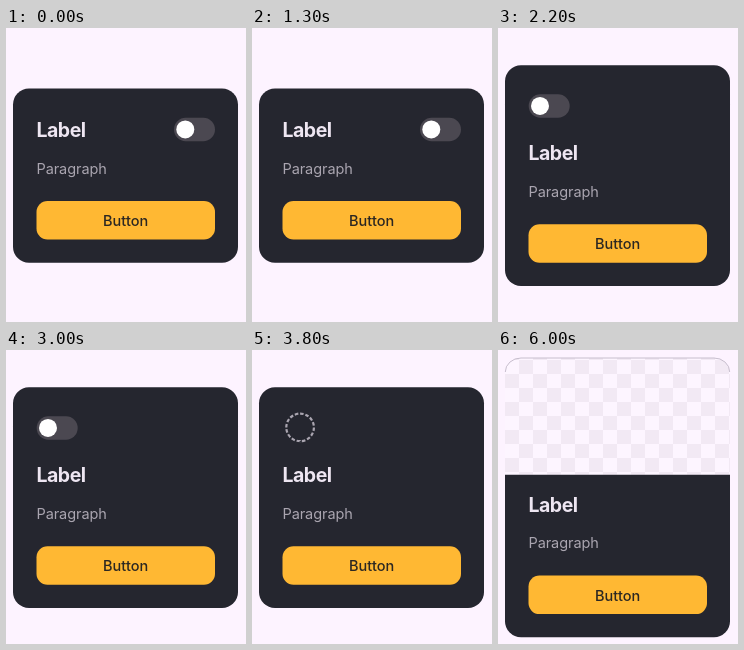
Animation, 240 px wide and 294 px high, one loop 8 s. Source, as an HTML page:

```html
<!DOCTYPE html>
<html lang="en">
<head>
<meta charset="utf-8">
<title>Card layouts</title>
<style>
  html, body { margin: 0; width: 100%; height: 100%; overflow: hidden; background: #fdf3ff; }
  svg { display: block; width: 100%; height: 100%; }
  text { font-family: Inter, sans-serif; }
  .label { font-size: 19.5px; font-weight: 650; letter-spacing: -.5px; fill: #eee6f2; }
  .paragraph { font-size: 14.5px; letter-spacing: -.08px; fill: #aaa5b0; }
  .button { font-size: 14.5px; font-weight: 450; fill: #2b2722; text-anchor: middle; }
</style>
</head>
<body>
<svg viewBox="0 0 240 294">
  <defs>
    <pattern id="checker" x="7" y="10" width="28" height="28" patternUnits="userSpaceOnUse">
      <rect width="28" height="28" fill="#fdf5ff"/>
      <path d="M14 0h14v14h-14zM0 14h14v14h-14z" fill="#f2e9f4"/>
    </pattern>
  </defs>

  <rect id="card" x="7" width="225" rx="16" fill="#25262f"/>

  <g id="toggle">
    <rect width="41" height="23.5" rx="11.75" fill="#4b4851"/>
    <circle cx="11.3" cy="11.7" r="9" fill="#fff"/>
  </g>

  <circle id="icon" cx="48.1" cy="77.4" r="13.8" fill="none" stroke="#aaa5b0" stroke-width="2.2"
          pathLength="80" stroke-dasharray="3.3 1.7"/>

  <g id="media">
    <path d="M6 124.6V7H233V124.6z" fill="#fdf3ff"/>
    <path d="M7 124.6V24a16 16 0 0 1 16-16H216a16 16 0 0 1 16 16V124.6z" fill="url(#checker)"/>
    <path d="M7.3 22A15.7 14 0 0 1 23 8H216A15.7 14 0 0 1 231.7 22"
          fill="none" stroke="#b9b0c0" stroke-width=".8"/>
  </g>

  <g id="content">
    <text class="label" x="30.5" y="109">Label</text>
    <text class="paragraph" x="30.5" y="145.9">Paragraph</text>
    <rect x="30.5" y="173" width="178.5" height="38.5" rx="11" fill="#ffb833"/>
    <text class="button" x="119.6" y="198">Button</text>
  </g>
</svg>
<script>
  const LOOP = 8000;
  const layouts = [
    { start: 0, top: 60.6, height: 174.2, shift: 0, header: "toggle", toggleAt: "168 89.7" },
    { start: 1400, top: 37.3, height: 220.7, shift: 23.3, header: "toggle", toggleAt: "30.7 66.2" },
    { start: 3800, top: 37.3, height: 220.7, shift: 23.3, header: "icon" },
    { start: 5800, top: 8, height: 279.3, shift: 52.6, header: "media" }
  ];
  const el = id => document.getElementById(id);

  function draw(time) {
    const layout = layouts.findLast(({ start }) => start <= time % LOOP);
    el("card").setAttribute("y", layout.top);
    el("card").setAttribute("height", layout.height);
    el("content").setAttribute("transform", `translate(0 ${layout.shift})`);
    for (const id of ["toggle", "icon", "media"]) {
      el(id).style.display = id === layout.header ? "" : "none";
    }
    if (layout.toggleAt) el("toggle").setAttribute("transform", `translate(${layout.toggleAt})`);
  }

  function tick() {
    draw(performance.now());
    requestAnimationFrame(tick);
  }
  tick();
</script>
</body>
</html>
```
